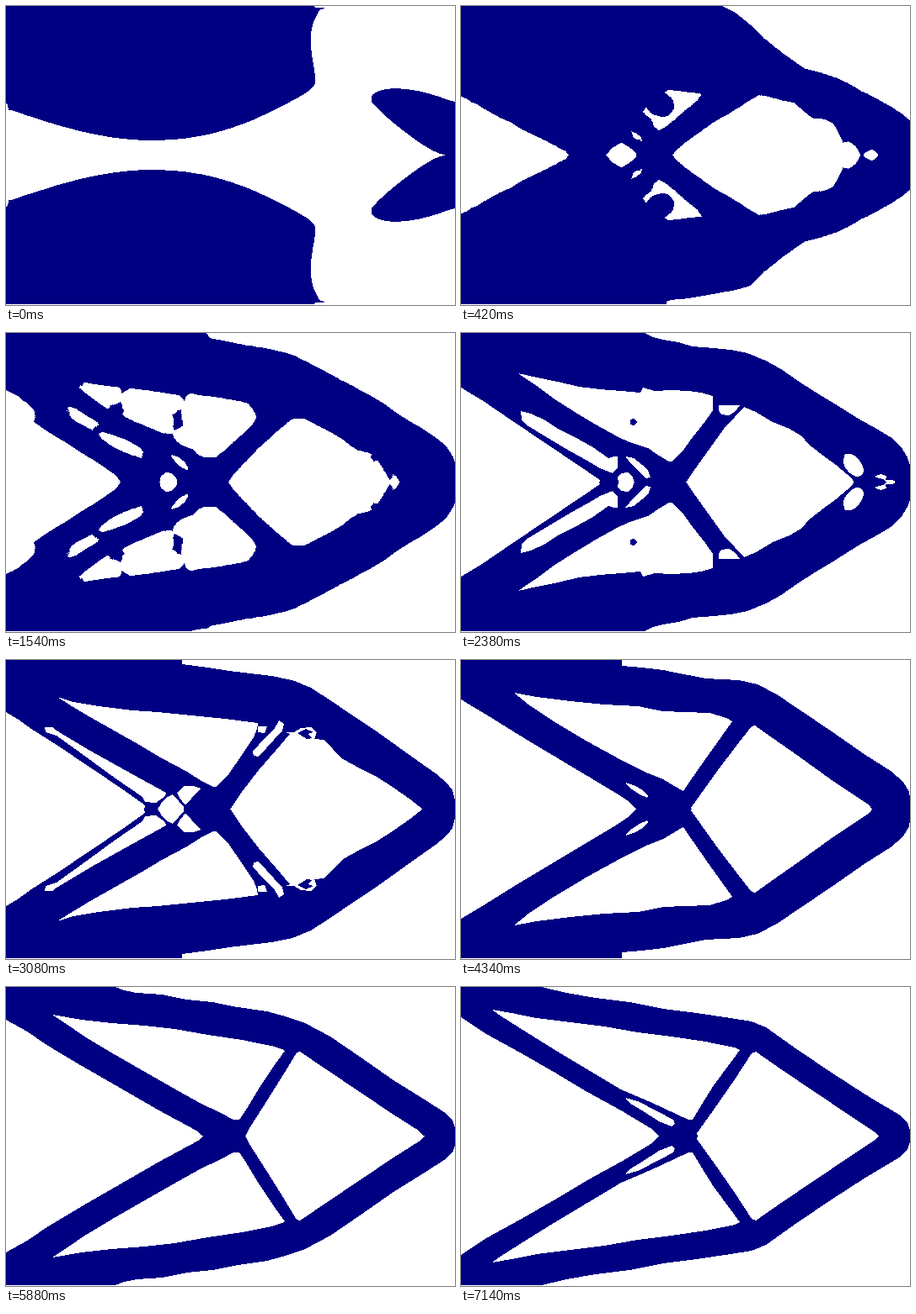
Animation, 533 px wide and 356 px high, one loop 7420 ms. Source, as an HTML page with a canvas:

```html
<!DOCTYPE html>
<html lang="en">
<head>
<meta charset="utf-8">
<title>Beam layout</title>
<style>
  html, body { margin: 0; width: 100%; height: 100%; overflow: hidden; background: #fff; }
  canvas { display: block; width: 533px; height: 356px; }
</style>
</head>
<body>
<canvas id="stage" width="533" height="356"></canvas>
<script>
const W = 533, H = 356, BEAM = 355, STEP = 140, LOOP = 7420, LAST = 51;
const NAVY = '#000083', WHITE = '#fff';

// Upper half of the beam at key steps; the lower half is its mirror image.
const keys = [
  {
    step: 0,
    solid: `M0 0H365L367 2H378V3L373 4C368 12 362 22 362 38C361 60 369 82 367 92
      C366 100 340 113 318 124C275 146 230 160 173 160C110 160 55 140 6 124L3 124L2 117L0 115Z
      M533 114L528 113C510 106 488 99 463 98C450 98 436 102 434 108L434 114
      C445 128 470 148 490 162C505 172 515 177 522 177L520 178H533Z`,
    holes: []
  },
  {
    step: 6,
    solid: `M0 0H244V5L275 10L300 16L325 22L343 29L362 40L385 51L412 62L432 72L450 83L470 98
      L490 111L508 123L521 133L530 145L533 153V178H0Z`,
    holes: [
      'M0 105L20 114L40 128L60 139L80 152L100 163L122 178H0Z',
      'M0 70L13 76L22 84L29 93L24 95L12 88L0 82Z',
      'M51 75L72 80L85 86L97 96L110 105L112 110L103 109L88 102L70 91L61 82Z',
      'M78 61L113 66L133 66L128 76L118 70L127 82L123 86L127 92L118 94L105 84L95 76Z',
      `M148 66L172 70L204 77L202 84L195 88L196 92L190 90L186 95L165 94L150 93L142 90L152 86L165 86
       L154 84L147 82L142 78Z`,
      'M138 96L165 97L190 101L198 104L194 114L186 116L170 111L150 105L140 101Z',
      `M218 76L240 81L270 89L301 98L298 108L285 120L268 131L256 139L244 146L235 150L226 146L222 140
       L213 136L205 131L203 124L208 121L206 116L213 112L210 102L216 97L218 90L225 88Z`,
      'M115 121L130 123L145 128L160 136L162 142L150 141L132 135L122 129Z',
      'M193 142L203 146L212 153L215 160L206 158L200 151Z',
      'M190 164L197 169L202 176L201 178H178L182 170Z',
      `M260 178L270 166L285 153L300 140L320 128L340 114L354 106L365 111L385 123L405 136L418 142
       L430 140L439 143L443 152L446 162L449 172L450 178Z`,
      'M458 166L465 171L467 178H461V172Z',
      'M483 178L488 174L493 178Z'
    ],
    spots: 'M228 80L234 83L233 90L226 91Z M230 115L238 118L245 122L240 126L232 122Z M433 148L439 150L437 157Z'
  },
  {
    step: 17,
    solid: `M0 0H218L228 5L240 8L258 11L275 16L300 18L320 20L340 24L362 33L380 43L400 57L420 70
      L445 85L470 101L495 115L510 124L522 135L530 148L533 157V178H0Z`,
    holes: [
      'M0 65L25 80L60 104L100 131L140 158L165 175L164 178H0Z',
      `M71 93L83 96L100 104L115 114L135 124L155 135L175 149L182 147H186V160L180 167L165 161L150 152
       L130 141L110 129L90 117L77 109L72 103Z`,
      `M68 48L90 53L115 58L140 64L165 67L190 69L213 71L216 65L230 69L250 68L270 69L285 71L299 75
       L299 92L290 105L275 124L262 142L250 153H247L235 146L222 137L200 130L185 123L160 109L135 94
       L110 78L90 63L75 53Z`,
      'M306 86H331L325 94L318 98L309 97L306 92Z',
      `M267 178L277 163L295 138L312 114L325 100L336 88L350 94L370 106L390 114L405 123L412 132
       L430 146L445 157L465 174L466 178Z`,
      'M455 145C460 141 470 145 475 155C480 163 478 170 472 171C465 172 455 162 454 154Z',
      'M491 171L498 168L505 170L504 175H510L515 176V178H505L502 174L497 173Z',
      'M187 178L186 172L190 167L198 166L203 170L206 178Z',
      'M195 147L205 149L215 157L222 163L225 172L219 173L212 165L204 158Z'
    ],
    spots: 'M201 103L206 102L209 106L206 110L201 109Z'
  },
  {
    step: 22,
    solid: `M0 0H209V5L240 9L265 13L290 16L315 19L340 24L362 33L385 48L410 65L440 85L465 103
      L490 121L510 135L523 146L530 155L533 167V178H0Z`,
    holes: [
      'M0 62L15 71L30 82L60 101L100 128L140 155L165 173L164 178H0Z',
      'M46 80L55 80L60 84L100 108L150 136L190 158L189 162L178 170L165 169L162 163L130 141L100 119L60 90L47 86Z',
      `M61 44L80 50L110 55L150 60L180 62L220 66L260 70L299 75L298 82L294 92L280 113L265 135L250 151
       H246L232 144L215 133L185 117L160 102L130 85L100 68L75 53Z`,
      'M299 79H310L307 87L299 86Z',
      'M324 72L330 76L328 84L318 95L300 115L294 114L293 109L306 94L318 83Z',
      `M266 178L280 157L300 131L320 108L337 88L332 86H342L350 81L362 80L369 86L366 94L378 95L388 106
       L400 118L420 129L440 139L460 152L480 166L495 178Z`,
      'M180 178L184 171L190 164L198 160L205 168L211 175V178Z',
      'M203 158L212 150L222 150L231 153L220 165L213 173L206 164Z'
    ],
    spots: 'M346 87L356 82L365 86L358 88L364 93L357 94Z'
  },
  {
    step: 31,
    solid: `M0 0H191V7L215 9L240 12L270 18L290 22L330 24L352 29L375 41L400 58L440 85L480 113
      L510 132L525 145L532 157L533 165V178H0Z`,
    holes: [
      'M0 47L30 65L70 90L110 114L150 138L185 159L200 169L208 178H0Z',
      `M63 39L90 44L130 49L170 53L210 55L240 61L265 62L295 63L315 69L322 73L310 90L290 118L270 147
       L264 156L255 151L240 142L220 134L190 119L150 97L110 73L80 53Z`,
      'M274 178L273 176L285 159L305 131L330 98L345 79L349 78L370 93L400 114L440 143L470 163L485 173L488 178Z',
      'M195 146L205 149L214 154L222 161L221 164L212 160L203 154Z'
    ]
  },
  {
    step: 42,
    solid: `M0 0H130L140 4L155 7L185 9L215 15L245 18L275 24L310 29L335 36L355 43L385 59L420 83
      L460 111L500 136L520 149L530 158L533 167V178H0Z`,
    holes: [
      'M0 39L25 53L50 70L90 94L130 117L180 146L215 165L228 172L234 178H0Z',
      `M55 33L90 39L125 43L165 46L200 50L240 57L280 63L315 70L328 74L331 76L320 91L300 121L285 146
       L277 158H270L255 150L230 138L205 124L170 104L130 81L95 60L70 43Z`,
      'M284 178L289 168L310 135L330 103L345 78L349 77L380 98L420 125L460 152L490 171L497 178Z'
    ]
  },
  {
    step: LAST,
    solid: `M0 0H96L125 7L160 13L200 18L240 26L280 31L320 37L345 41L362 48L400 75L440 102L480 128
      L505 143L522 153L530 162L533 170V178H0Z`,
    holes: [
      'M0 36L30 56L70 78L110 101L150 125L190 147L225 168L236 178H0Z',
      `M37 27L60 31L90 37L130 42L170 47L210 54L250 59L290 65L325 72L331 75L320 90L300 117L285 141
       L275 158H270L255 151L225 137L190 122L150 98L110 74L70 49L45 33Z`,
      'M281 178L280 174L300 146L325 110L345 79L350 77L380 98L420 125L460 152L490 172L497 178Z',
      'M195 132L210 136L235 149L252 158L254 163L250 166L235 160L215 147L200 138Z'
    ]
  }
];

function drawHalf(c, key) {
  const fill = (d, color) => { c.fillStyle = color; c.fill(new Path2D(d)); };
  fill(key.solid, NAVY);
  key.holes.forEach(d => fill(d, WHITE));
  if (key.spots) fill(key.spots, NAVY);
}

// Distance of each pixel to the nearest pixel where mask equals value.
function distance(mask, value) {
  const d = new Float32Array(W * H);
  for (let i = 0; i < d.length; i++) d[i] = mask[i] === value ? 0 : 1e4;
  const sweep = dir => {
    const y0 = dir > 0 ? 0 : H - 1, x0 = dir > 0 ? 0 : W - 1;
    for (let y = y0; y >= 0 && y < H; y += dir) {
      for (let x = x0; x >= 0 && x < W; x += dir) {
        const i = y * W + x, up = i - dir * W;
        let m = d[i];
        if (x !== x0) m = Math.min(m, d[i - dir] + 1);
        if (y !== y0) {
          m = Math.min(m, d[up] + 1);
          if (x > 0) m = Math.min(m, d[up - 1] + Math.SQRT2);
          if (x < W - 1) m = Math.min(m, d[up + 1] + Math.SQRT2);
        }
        d[i] = m;
      }
    }
  };
  sweep(1);
  sweep(-1);
  return d;
}

// Signed distance field: negative inside the material.
function buildField(key) {
  const cv = document.createElement('canvas');
  cv.width = W;
  cv.height = H;
  const c = cv.getContext('2d', { willReadFrequently: true });
  c.fillStyle = WHITE;
  c.fillRect(0, 0, W, H);
  drawHalf(c, key);
  c.setTransform(1, 0, 0, -1, 0, BEAM);
  drawHalf(c, key);
  const px = c.getImageData(0, 0, W, H).data;
  const mask = new Uint8Array(W * H);
  for (let i = 0; i < mask.length; i++) mask[i] = px[i * 4] < 128 ? 1 : 0;
  const out = distance(mask, 1), inside = distance(mask, 0);
  return out.map((v, i) => v - inside[i]);
}

const fields = keys.map(buildField);
const ctx = document.getElementById('stage').getContext('2d');
const img = ctx.createImageData(W, H);
const pixels = new Uint32Array(img.data.buffer);
const INK = 0xff830000, PAPER = 0xffffffff;

function paint(step) {
  let k = 0;
  while (k < keys.length - 2 && step >= keys[k + 1].step) k++;
  let u = (step - keys[k].step) / (keys[k + 1].step - keys[k].step);
  if (k === 0) u = 1 - (1 - u) ** 2;
  const a = fields[k], b = fields[k + 1];
  for (let i = 0; i < pixels.length; i++) {
    pixels[i] = a[i] + (b[i] - a[i]) * u < 0 ? INK : PAPER;
  }
  ctx.putImageData(img, 0, 0);
}

let shown = -1;
const start = performance.now();
function tick() {
  const t = (performance.now() - start) % LOOP;
  const step = Math.min(LAST, Math.floor(t / STEP));
  if (step !== shown) paint(shown = step);
  requestAnimationFrame(tick);
}
tick();
</script>
</body>
</html>
```
